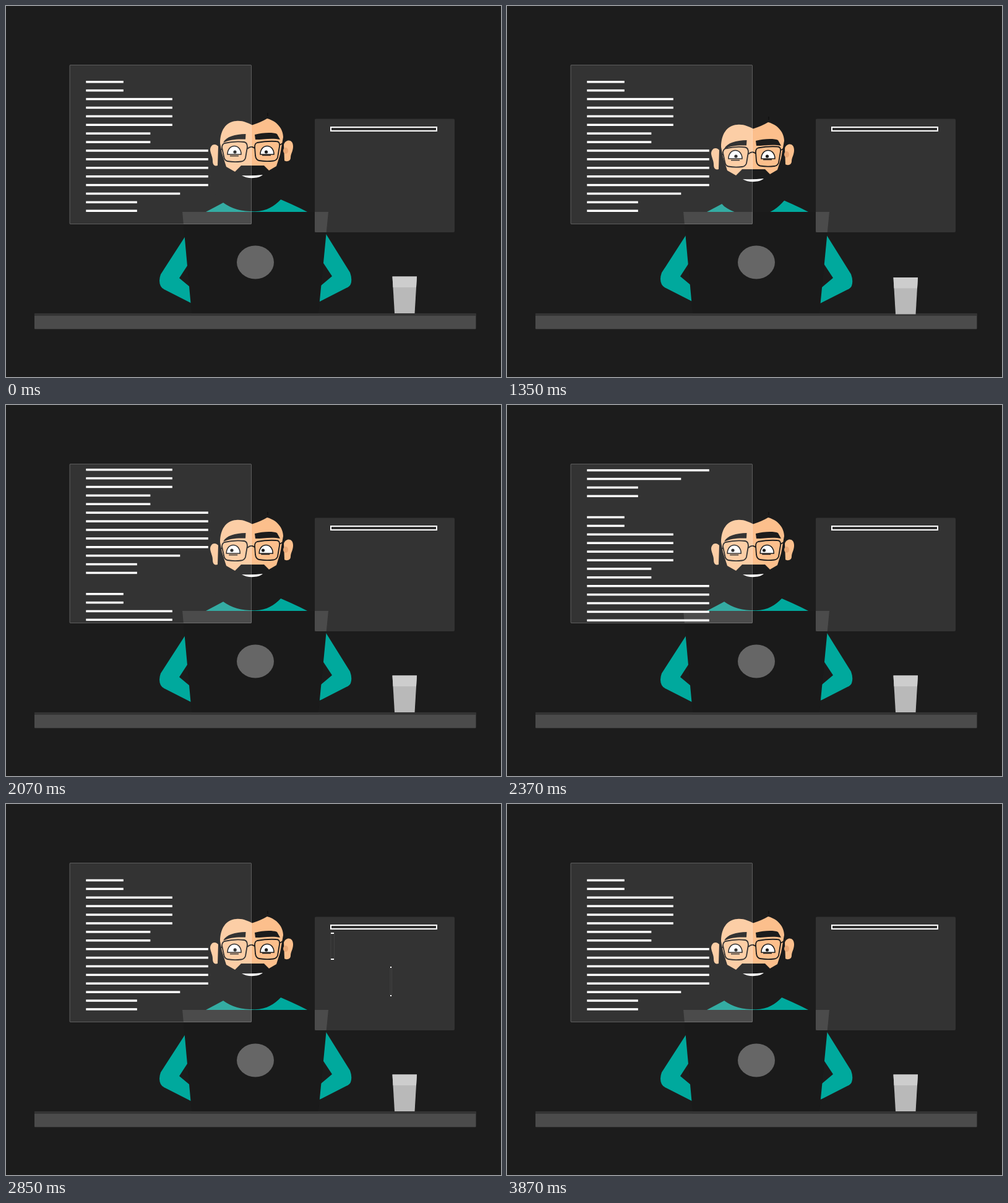
Recreate the animation shown at these times as an HTML page. Size 800x600 px, loop 4.14 s.

```html
<!DOCTYPE html>
<html>
<head>
<meta charset="utf-8">
<style>
html, body { margin: 0; width: 100%; height: 100%; overflow: hidden; background: #1c1c1c; }
svg { display: block; width: 800px; height: 600px; }
</style>
</head>
<body>
<svg viewBox="0 0 800 600">
  <defs>
    <!-- hard colour change where the left window overlaps -->
    <linearGradient id="skin" gradientUnits="userSpaceOnUse" x1="0" x2="794" y1="0" y2="0">
      <stop offset=".5" stop-color="#fcc89c"/><stop offset=".5" stop-color="#fcbf8c"/>
    </linearGradient>
    <linearGradient id="shirt" gradientUnits="userSpaceOnUse" x1="0" x2="794" y1="0" y2="0">
      <stop offset=".5" stop-color="#1da398"/><stop offset=".5" stop-color="#00a99d"/>
    </linearGradient>
    <clipPath id="pane"><rect x="103" y="94" width="294" height="259"/></clipPath>
  </defs>

  <path fill="url(#shirt)" d="M323 333L370 308H432Q462 320 487 333Z"/>

  <g id="head">
    <path fill="#1c1c1c" d="M338 304L351 318C365 328 380 332.3 402 332.3C422 332 434 323 444 313L458 298V270H338Z"/>
    <path stroke="#0a0a0a" d="M423 173V178"/>
    <g fill="url(#skin)">
      <path d="M343 227C338 221 330 224 330 233C331 240 334 244 334 250C334 259 339 259 342 258Z"/>
      <path d="M449 224C452 215 464 215 464 227C464 235 460 239 460 245C460 252 452 252 450 250Z"/>
      <path d="M346 222C346 202 355 187 372 186C383 185 390 189 398 192.500Q412 188 422 182C438 186 448 199 448 212L443 240L437 259L425 266L417 258H380L370 268L356 260L349 238Z"/>
    </g>
    <ellipse cx="452" cy="234" rx="4" ry="5" fill="#e9a877"/>
    <path fill="#fff" d="M381 274Q398 275 415 273C408 279.500 390 280 381 274Z"/>
  </g>

  <g id="eyes">
    <g id="whites" fill="#fff" stroke="#1c1c1c" stroke-width="1.5">
      <path d="M358 240C358 222 380 222 380 240Z"/>
      <path d="M411 240C411 222 433 222 433 240Z"/>
      <path d="M362 242.500H376M414 241.500H428"/>
    </g>
    <g id="pupils" fill="#1c1c1c"><circle cx="370" cy="236" r="2.600"/><circle cx="420.500" cy="236" r="2.600"/></g>
  </g>

  <g id="glasses" fill="none" stroke="#1c1c1c" stroke-width="1.800">
    <path d="M353 222Q370 218 385 220Q390 221 390 228L387 246Q385 251 380 251.500Q368 253 358 251Q353 250 352 243L349 229Q349 224 353 222Z"/>
    <path d="M406 221Q422 218 437 219Q443 219 442 227L439 245Q437 250 432 250.500Q420 252 409 250Q404 249 403 242L402 228Q402 222 406 221Z"/>
    <path d="M390 231Q396 225 402 230M442 225L449 221M349 231L346 234"/>
  </g>
  <g id="brows" fill="#1c1c1c">
    <path d="M351 221C356 211 370 207.500 387.500 207L387 215.500C372 215 361 216 351 221Z"/>
    <path d="M402 208C415 204.500 432 204 438 207L443 216C430 213 415 216 403 216Z"/>
  </g>

  <g fill="#00a99d">
    <path id="armL" d="M310 341L250 434Q246 445 250 453Q252 457 257 459L310 486V465L280 440L304 403Z"/>
    <path id="armR" d="M498 338L556 431Q560 442 557 450Q555 454 550 456L495 484V464L527 437L500 396Z"/>
  </g>
  <path fill="#1a1a1a" d="M285 333H521L505 497H300Z"/>
  <ellipse cx="403" cy="414.500" rx="30" ry="27" fill="#666"/>

  <path fill="#363636" d="M285 333H397V353H286.800ZM499 333H521L517.800 366H499Z"/>
  <g fill="#fff" fill-opacity=".1">
    <rect x="103" y="95.500" width="293.500" height="257" rx="1" stroke="#fff" stroke-opacity=".25"/>
    <rect x="499" y="182.500" width="226" height="183.500" rx="2"/>
  </g>

  <g clip-path="url(#pane)"><g id="code" fill="#fff"></g></g>
  <g id="boxes" fill="none" stroke="#fff" stroke-width="2">
    <rect x="525" y="196" width="171" height="6"/>
  </g>

  <g id="desk">
    <rect x="46" y="497" width="713.500" height="25.500" rx="1" fill="#4b4b4b"/>
    <rect x="46" y="497" width="713.500" height="4" fill="#343434"/>
  </g>
  <g id="glass">
    <path fill="#b9b9b9" d="M624.500 437.500H664L660.500 497H628Z"/>
    <path fill="#cdcdcd" d="M624.500 437.500H664L663 455H625.500Z"/>
  </g>
</svg>
<script>
const LOOP = 4140, SCROLL = 242;
const { PI, sin, abs, min, max } = Math;
const el = id => document.getElementById(id);
const set = (node, value) => node.setAttribute('transform', value);
const move = (id, x, y) => set(el(id), `translate(${x} ${y})`);

// Eased rise from 0 to 1, beginning at start
function ramp(t, start, length) {
  const u = max(0, min(1, (t - start) / length));
  return u < .5 ? 2 * u * u : 1 - 2 * (1 - u) ** 2;
}

function addRect(parent, x, y, width, height) {
  const r = document.createElementNS('http://www.w3.org/2000/svg', 'rect');
  for (const [k, v] of Object.entries({ x, y, width, height })) r.setAttribute(k, v);
  return parent.appendChild(r);
}

// Code block as runs of equal lines: count, width
const runs = [[2, 60.5], [4, 139.5], [2, 104], [5, 197.5], [1, 152], [2, 82.5]];
const widths = runs.flatMap(([count, w]) => Array(count).fill(w));
for (const top of [121, 121 + SCROLL + .7])
  widths.forEach((w, i) => addRect(el('code'), 129.3, top + i * 13.9, w, 3.5));

// x, y, width, height
const boxes = [
  [525, 209, 172, 42], [621, 264, 75, 46], [525, 264, 87, 89], [621, 319, 75, 34]
].map(([x, y, w, h], i) => ({
  x, start: 2790 + 90 * max(0, i - 1), node: addRect(el('boxes'), 0, y, w, h)
}));

function draw(t) {
  const headDown = ramp(t, 30, 510) - ramp(t, 1650, 210);
  const faceDown = ramp(t, 30, 590) - ramp(t, 1590, 300);
  move('head', 0, 6 * headDown);
  move('eyes', 0, 7 * faceDown);
  move('glasses', 0, 8.5 * faceDown);
  move('brows', 0, 10 * faceDown);

  // glance at the code, then at the layout
  const look = 5 * (ramp(t, 2480, 260) - ramp(t, 1700, 250) + ramp(t, 2820, 250) - ramp(t, 3500, 350));
  move('whites', look * .35, 0);
  move('pupils', look, -abs(look) * .2);

  // typing shakes the arms, desk and glass
  const bob = t < 1800 ? 3.8 * sin(PI * t / 200) : 0;
  move('armL', 0, -bob);
  move('armR', 0, bob);
  const sway = t < 2025 ? 1.2 * sin(4 * PI * t / 1350) : 0;
  set(el('desk'), `rotate(${sway} 400 300)`);
  const tip = t < 1890 ? sin(PI * t / 270) ** 2 : 0;
  const drop = t < 1890 ? 1.5 * min(1, t / 90) : 0;
  set(el('glass'), `translate(0 ${drop - 2.8 * tip}) rotate(${-3.2 * tip} 644.5 467)`);

  move('code', 0, -SCROLL * ramp(t, 1722, 993));
  for (const { x, start, node } of boxes) {
    const s = ramp(t, start, 480) - ramp(t, start + 530, 290);
    node.style.display = s > .001 ? '' : 'none';
    set(node, `translate(${x} 0) scale(${s} 1)`);
  }
}

const begin = performance.now();
function frame() {
  draw((performance.now() - begin) % LOOP);
  requestAnimationFrame(frame);
}
frame();
</script>
</body>
</html>
```
